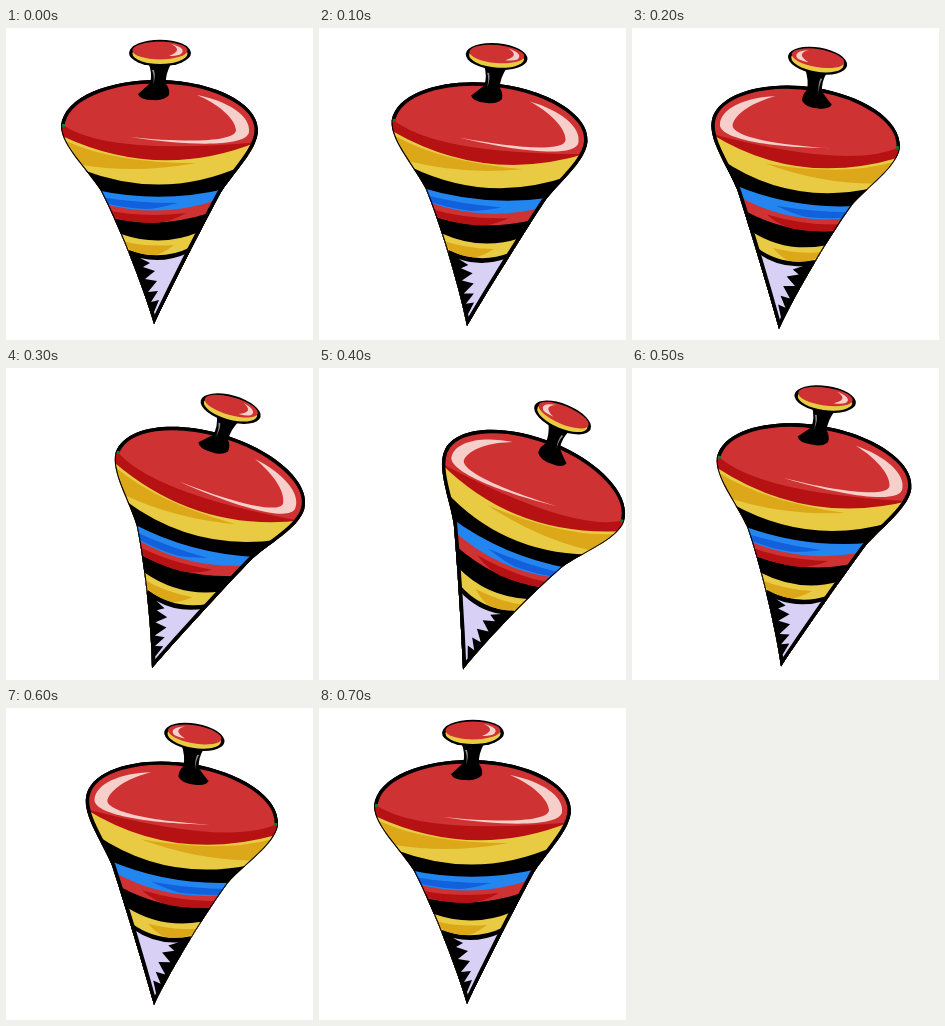
Recreate the animation shown at these times as an HTML page with a canvas. Size 307 by 312 pixels, loop 0.8 s.

```html
<!DOCTYPE html>
<html lang="en">
<head>
<meta charset="utf-8">
<title>Spinning top</title>
<style>
  html, body { margin: 0; width: 100%; height: 100%; overflow: hidden; background: #fff; }
  canvas { display: block; width: 100%; height: 100%; }
</style>
</head>
<body>
<canvas id="stage" width="307" height="312"></canvas>
<script>
const ctx = document.getElementById('stage').getContext('2d');
const STEP = 100;
const TIP = { x: 148, y: 296 };
const RED = '#cf3232', DARK_RED = '#b61214', YELLOW = '#e8cb42', GOLD = '#dca81a',
      BLUE = '#2385f0', DARK_BLUE = '#1260dc', LILAC = '#d9d0f5', PINK = '#f6cfca',
      BLACK = '#000';

// Each pose: tip position, tilt in degrees, mirrored or not, width factor.
const poses = [
  { x: 148, y: 296, tilt: 0, flip: 1, wide: 1 },
  { x: 148, y: 298, tilt: 5, flip: 1, wide: 1 },
  { x: 147, y: 301, tilt: 9.4, flip: -1, wide: 0.965 },
  { x: 146, y: 300, tilt: 15.6, flip: 1, wide: 1 },
  { x: 144, y: 301.5, tilt: 22.8, flip: -1, wide: 0.98 },
  { x: 149, y: 298.5, tilt: 8.1, flip: 1, wide: 1 },
  { x: 148, y: 297, tilt: 9.8, flip: -1, wide: 0.985 },
  { x: 148, y: 296, tilt: 0, flip: 1, wide: 1 }
];

const rim = 'M55 98C58 68 105 52 150 52C205 52 252 74 252 102' +
            'C252 122 226 146 214 166C200 192 170 250 148 296';
const body = new Path2D(rim + 'C136 255 112 196 95 163C82 142 55 118 55 98Z');
const rimLine = new Path2D(rim);

// Stripes are painted downwards, each covering all below its upper edge.
const stripes = [
  [DARK_RED, 50, 92, 92, 129, 255, 114],
  [YELLOW, 56, 108, 155, 154, 254, 113],
  [BLACK, 77, 142, 158, 173, 236, 138],
  [BLUE, 90, 162, 155, 176, 219, 161],
  [RED, 98, 176, 155, 191, 211, 172],
  [BLACK, 106, 190, 155, 201, 203, 185],
  [YELLOW, 115, 206, 155, 220, 193, 204],
  [BLACK, 123, 222, 155, 234, 185, 219]
];

function fill(path, color) {
  ctx.fillStyle = color;
  ctx.fill(typeof path === 'string' ? new Path2D(path) : path);
}

function oval(x, y, rx, ry, color) {
  const p = new Path2D();
  p.ellipse(x, y, rx, ry, 0, 0, Math.PI * 2);
  fill(p, color);
}

function stroke(path, width) {
  ctx.strokeStyle = BLACK;
  ctx.lineWidth = width;
  ctx.stroke(path);
}

function drawBody() {
  ctx.save();
  ctx.clip(body);
  fill(body, RED);
  for (const [color, x0, y0, cx, cy, x1, y1] of stripes) {
    fill(`M${x0} ${y0}Q${cx} ${cy} ${x1} ${y1}V300H${x0}Z`, color);
  }
  // Shaded sides of the stripes
  fill('M60 113Q108 135 190 135Q130 146 76 137Z', GOLD);
  fill('M94 169Q130 175 172 175Q150 181 140 181Q118 180 98 175Z', DARK_BLUE);
  fill('M100 182Q135 190 180 185Q165 194 150 195Q125 195 106 189Z', DARK_RED);
  fill('M117 213Q137 219 168 217Q155 227 148 227Q134 227 123 221Z', GOLD);
  fill('M134 230Q158 236 182 225L150 290L148 284L153 272L145 274' +
       'L152 263L142 264L151 253L139 251L149 243L137 239L144 235Z', LILAC);
  // Sheen on the lid
  fill('M191 67C222 73 245 88 243 104C241 118 190 119 124 109' +
       'C180 115 230 114 230 102C229 90 212 76 191 67Z', PINK);
  stroke(rimLine, 7);
  stroke(body, 2);
  ctx.restore();
  ctx.fillStyle = '#0b7a2a';
  ctx.fillRect(56, 96, 3, 3);
}

function drawKnob() {
  fill('M142 34H166Q159 46 160 56Q164 61 163 67Q158 73 147 72' +
       'Q134 72 132 66Q137 62 144 55Q147 46 142 34Z', BLACK);
  fill('M148 42Q150 49 147 57Q149 49 146 42Z', '#8a8a92');
  oval(154, 25, 31, 13.3, BLACK);
  oval(154, 25.5, 27.5, 10.5, YELLOW);
  oval(154, 22.5, 27.5, 9, RED);
  fill('M165 16Q181 20 175 26Q171 28 163 28Q178 22 165 16Z', PINK);
}

function draw(now) {
  const p = poses[Math.floor(now / STEP) % poses.length];
  ctx.fillStyle = '#fff';
  ctx.fillRect(0, 0, 307, 312);
  ctx.save();
  ctx.translate(p.x, p.y);
  ctx.rotate(p.tilt * Math.PI / 180);
  ctx.scale(p.flip * p.wide, 1);
  ctx.translate(-TIP.x, -TIP.y);
  drawBody();
  drawKnob();
  ctx.restore();
}

const start = performance.now();
function tick() {
  draw(performance.now() - start);
  requestAnimationFrame(tick);
}
tick();
</script>
</body>
</html>
```
